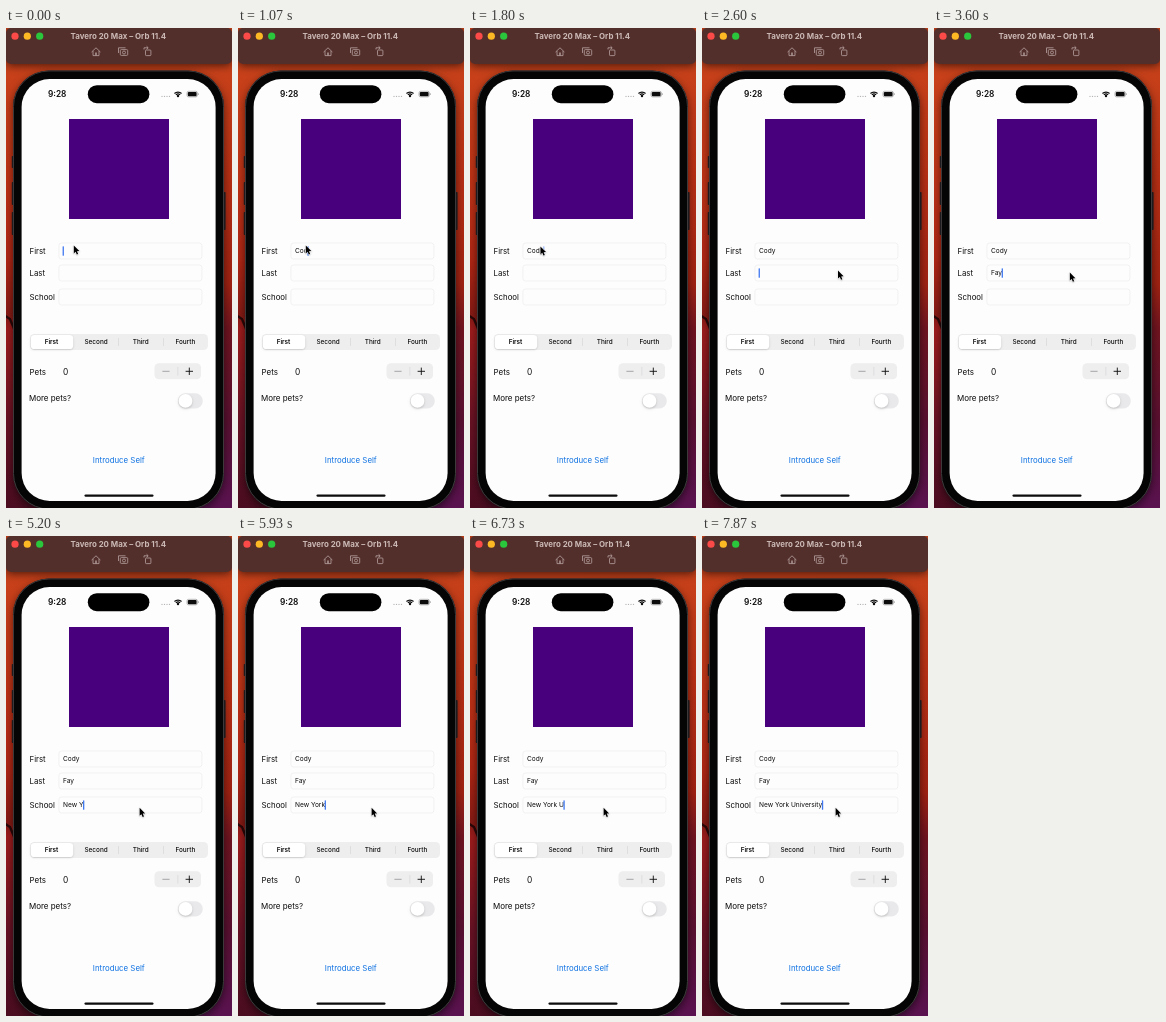
Animation of 226 by 480 pixels, one loop 8 s. Source, as an HTML page with a canvas:

```html
<!DOCTYPE html>
<html lang="en">
<head>
<meta charset="utf-8">
<title>Form demo</title>
<style>
html, body { margin: 0; width: 100%; height: 100%; overflow: hidden; background: #200608; }
canvas { display: block; width: 226px; height: 480px; }
</style>
</head>
<body>
<canvas id="stage"></canvas>
<script>
const W = 226, H = 480, LOOP = 8000;
const FONT = 'Inter, "Liberation Sans", sans-serif';
const INK = '#0c0c0c';
const canvas = document.getElementById('stage');
const ctx = canvas.getContext('2d');
const ratio = window.devicePixelRatio || 1;
canvas.width = W * ratio;
canvas.height = H * ratio;
ctx.scale(ratio, ratio);

// Each field: text, the time it gains focus, and the time of every key press.
const fields = [
  { label: 'First', y: 223, focus: 0, text: 'Cody', keys: [470, 730, 930, 1200] },
  { label: 'Last', y: 245, focus: 2400, text: 'Fay', keys: [2870, 3000, 3130] },
  { label: 'School', y: 269, focus: 4200, text: 'New York University',
    keys: [4600, 4730, 4870, 4940, 5070, 5330, 5530, 5670, 6070, 6470,
           6800, 6870, 7000, 7070, 7130, 7270, 7400, 7530, 7800] }
];
const moves = [
  { from: 1730, to: 2330, x: 136, y: 242.6 },
  { from: 3500, to: 4130, x: 133.6, y: 271.8 }
];

function rect(x, y, w, h, r, fill, stroke, line = 0.7) {
  ctx.beginPath();
  ctx.roundRect(x, y, w, h, r);
  if (fill) { ctx.fillStyle = fill; ctx.fill(); }
  if (stroke) { ctx.strokeStyle = stroke; ctx.lineWidth = line; ctx.stroke(); }
}

function dot(x, y, r, fill) {
  ctx.beginPath();
  ctx.arc(x, y, r, 0, Math.PI * 2);
  ctx.fillStyle = fill;
  ctx.fill();
}

function path(points, color, line = 0.8) {
  ctx.beginPath();
  points.forEach(([x, y]) => ctx.lineTo(x, y));
  ctx.strokeStyle = color;
  ctx.lineWidth = line;
  ctx.stroke();
}

// Draws text with its capitals centred on y.
function label(text, x, y, size, weight = 400, color = INK, align = 'left') {
  ctx.font = `${weight} ${size}px ${FONT}`;
  ctx.textAlign = align;
  ctx.fillStyle = color;
  ctx.fillText(text, x, y + size * 0.364);
}

function vertical(stops) {
  const g = ctx.createLinearGradient(0, 32, 0, H);
  stops.forEach(([at, color]) => g.addColorStop(at, color));
  return g;
}

function shadowed(color, blur, dy, draw) {
  ctx.save();
  ctx.shadowColor = color;
  ctx.shadowBlur = blur * ratio;
  ctx.shadowOffsetY = dy * ratio;
  draw();
  ctx.restore();
}

function drawDesktop() {
  ctx.fillStyle = vertical([[0, '#c8421a'], [0.25, '#c03416'], [0.45, '#b02614'],
    [0.57, '#861a14'], [0.6, '#a01c1c'], [0.8, '#6a1224'], [1, '#4a0c20']]);
  ctx.fillRect(0, 0, W / 2, H);
  ctx.fillStyle = vertical([[0, '#c8421a'], [0.25, '#b83014'], [0.5, '#a02212'],
    [0.6, '#701420'], [0.8, '#5a1030'], [1, '#5a1250']]);
  ctx.fillRect(W / 2, 0, W / 2, H);
  path([[-2, 287], [4, 291], [9, 303]], '#2a0708', 2.4);
}

function drawToolbar() {
  const ink = '#b7a3a1';
  shadowed('rgba(0,0,0,.6)', 8, 2, () => rect(0, 0, W, 36, 5, '#532f2b'));
  dot(9, 8.2, 3.6, '#fb4a48');
  dot(21.3, 8.2, 3.6, '#fdb924');
  dot(33.7, 8.2, 3.6, '#2ac63c');
  label('Tavero 20 Max – Orb 11.4', 64.5, 8, 7.9, 700, '#cbb9b6');

  path([[85.6, 24], [90, 19.8], [94.4, 24]], ink);
  path([[87, 23], [87, 27.6], [93, 27.6], [93, 23]], ink);
  path([[90, 27.4], [90, 24.6]], ink, 1.4);

  path([[112.5, 25], [112.5, 19.8], [119.5, 19.8]], ink);
  rect(114.3, 21.6, 7.4, 5.8, 1, null, ink, 0.8);
  ctx.beginPath();
  ctx.arc(118, 24.5, 1.5, 0, Math.PI * 2);
  ctx.stroke();

  rect(139.5, 22, 5.4, 5.6, 0.8, null, ink, 0.8);
  path([[138, 21.5], [138, 19.8], [142, 19.8]], ink);
  path([[140.6, 18.3], [142.2, 19.8], [140.6, 21.2]], ink);
}

function drawPhone() {
  [[128, 12], [154, 23], [184, 23]].forEach(([y, h]) => rect(5.8, y, 2, h, 0.8, '#262325'));
  rect(217.6, 164, 2, 38, 0.8, '#262325');
  shadowed('rgba(0,0,0,.55)', 9, 3, () => rect(7, 42.5, 211, 439, 36, '#1c1a1c'));
  rect(7.5, 43, 210, 438, 35.5, '#050505', '#3d393b', 1);
  rect(15.6, 51, 194, 422, 28, '#fdfdfd');
  rect(81.8, 57.2, 61.6, 18, 9, '#000');

  label('9:28', 42, 66.2, 8.3, 600);
  for (let i = 0; i < 4; i++) dot(156 + i * 2.5, 68.4, 0.65, '#b5b5b5');
  ctx.strokeStyle = INK;
  ctx.lineWidth = 1.25;
  [5, 3].forEach(r => {
    ctx.beginPath();
    ctx.arc(172, 69, r, -Math.PI * 0.75, -Math.PI * 0.25);
    ctx.stroke();
  });
  dot(172, 68, 1.2, INK);
  rect(181, 63.3, 10.4, 5.6, 1.6, null, '#8a8a8a', 0.6);
  rect(181.8, 64, 8.8, 4.2, 1, INK);
  rect(192, 65.1, 0.8, 1.9, 0.4, '#9a9a9a');
  rect(78.5, 466.4, 69, 2.4, 1.2, INK);
}

function drawControls() {
  rect(24, 306, 178, 16, 4.4, '#eeeeef');
  shadowed('rgba(0,0,0,.18)', 2, 0.8, () => rect(24.8, 307, 42.4, 14, 3.6, '#fff'));
  [112, 157].forEach(x => rect(x, 310, 0.6, 8, 0, '#d3d3d6'));
  ['First', 'Second', 'Third', 'Fourth'].forEach((name, i) =>
    label(name, 45.5 + i * 44.6, 314, 6.4, i ? 500 : 600, INK, 'center'));

  label('Pets', 23.4, 343.7, 8);
  label('0', 57, 343.5, 8.3);
  rect(148.5, 335.3, 46.5, 16, 4.4, '#eeeeef');
  rect(171.6, 339, 0.6, 8.6, 0, '#d3d3d6');
  path([[156.4, 343.3], [163.6, 343.3]], '#9d9da0', 0.9);
  path([[179.6, 343.3], [187, 343.3]], INK, 0.9);
  path([[183.3, 339.6], [183.3, 347]], INK, 0.9);

  label('More pets?', 22.9, 370.3, 8);
  rect(171.8, 365.2, 25, 15.4, 7.7, '#e9e9eb');
  shadowed('rgba(0,0,0,.2)', 2.5, 1, () => dot(179.5, 372.9, 6.9, '#fff'));

  label('Introduce Self', 112.8, 432, 7.85, 400, '#0f72e2', 'center');
}

// Solid for half a second after an edit, then a soft one-second blink.
function caretAlpha(idle) {
  const p = idle % 1000;
  if (p < 500) return 1;
  if (p < 700) return 1 - (p - 500) / 200;
  return p < 850 ? 0 : (p - 850) / 150;
}

function drawFields(t) {
  const active = fields.filter(f => t >= f.focus).pop();
  fields.forEach(f => {
    const count = f.keys.filter(k => k <= t).length;
    const typed = f.text.slice(0, count);
    label(f.label, 23.5, f.y, 7.85);
    rect(52.9, f.y - 8, 143, 16, 2.6, '#fdfdfd', '#ececed');
    label(typed, 57, f.y, 6.6);
    if (f !== active) return;
    const x = 56.6 + ctx.measureText(typed).width;
    ctx.globalAlpha = caretAlpha(t - (count ? f.keys[count - 1] : f.focus));
    rect(x, f.y - 4.8, 1.3, 9.6, 0.6, '#3f78f0');
    ctx.globalAlpha = 1;
  });
}

function drawPointer(t) {
  let x = 67.8, y = 217.4;
  moves.forEach(m => {
    const p = Math.min(1, Math.max(0, (t - m.from) / (m.to - m.from)));
    const ease = p * p * (3 - 2 * p);
    x += (m.x - x) * ease;
    y += (m.y - y) * ease;
  });
  ctx.save();
  ctx.translate(x, y);
  ctx.beginPath();
  [[0, 0], [0, 8], [1.8, 6.4], [3, 9.2], [4.4, 8.6], [3.2, 5.8], [5.6, 5.7]]
    .forEach(([px, py]) => ctx.lineTo(px, py));
  ctx.closePath();
  ctx.lineJoin = 'round';
  ctx.lineWidth = 1;
  ctx.strokeStyle = '#fff';
  shadowed('rgba(0,0,0,.25)', 1.5, 0.6, () => ctx.stroke());
  ctx.fillStyle = '#000';
  ctx.fill();
  ctx.restore();
}

const start = performance.now();

function frame() {
  const t = (performance.now() - start) % LOOP;
  drawDesktop();
  drawPhone();
  drawToolbar();
  rect(63, 91, 100, 100, 0, '#48007d');
  drawFields(t);
  drawControls();
  drawPointer(t);
  requestAnimationFrame(frame);
}
frame();
</script>
</body>
</html>
```
